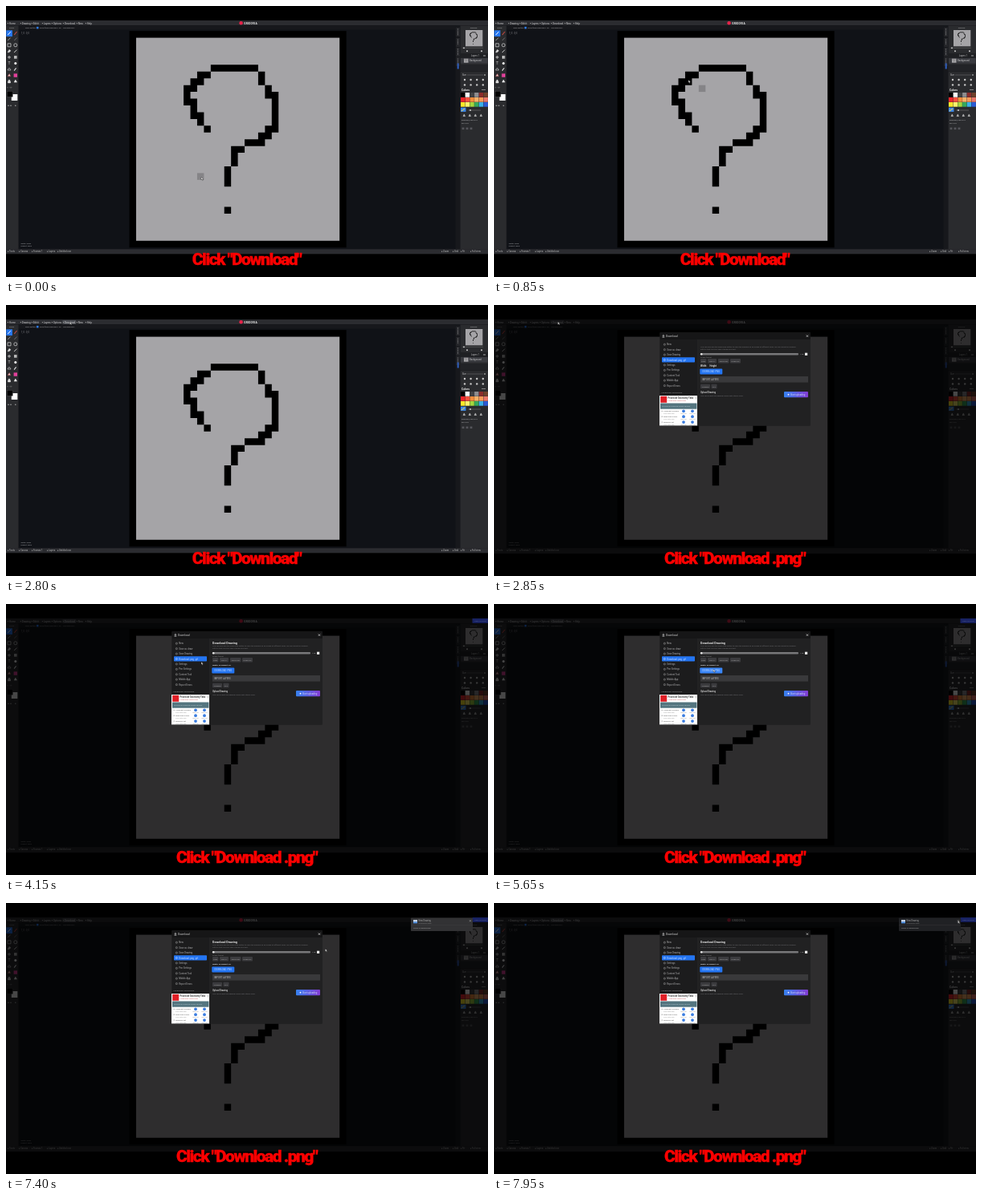
These frames come from a looping animation (600x338 px, 8 s). An HTML page:

```html
<!DOCTYPE html>
<html lang="en">
<head>
<meta charset="utf-8">
<title>Download a drawing</title>
<style>
html, body { margin: 0; width: 100%; height: 100%; overflow: hidden; background: #000; }
svg { display: block; width: 100vw; height: 100vh; }
text { font-family: Roboto, "Open Sans", sans-serif; white-space: pre; }
.caption { font: 900 21px Roboto, "Open Sans", sans-serif; letter-spacing: -1.5px; text-anchor: middle; fill: #f00; stroke: #f00; stroke-width: .3; }
</style>
</head>
<body>
<svg id="stage" viewBox="0 0 600 338"></svg>
<script>
const LOOP = 8000, OPEN = 2850, LOADED = 2900, NOTICE = 6200;
const CELL = 8.44, LEFT = 162, TOP = 39.6, SIZE = 30;

const rect = (x, y, w, h, fill, extra = '') =>
  `<rect x="${x}" y="${y}" width="${w}" height="${h}" fill="${fill}" ${extra}/>`;
const dot = (x, y, r, fill) => `<circle cx="${x}" cy="${y}" r="${r}" fill="${fill}"/>`;
const path = (d, stroke, width = .7, fill = 'none') =>
  `<path d="${d}" stroke="${stroke}" stroke-width="${width}" fill="${fill}"/>`;
const text = (x, y, s, size = 3, fill = '#c8c8ca', extra = '') =>
  `<text x="${x}" y="${y}" font-size="${size}" fill="${fill}" ${extra}>${s}</text>`;
const bold = 'font-weight="700"', mid = 'text-anchor="middle"';
const group = (id, body) => `<g id="${id}">${body}</g>`;

// Strokes of the drawing, in canvas cells: x y w h
const strokes = ['11 4 7 1', '9 5 2 1', '8 6 2 1', '7 7 2 1', '7 8 1 2', '8 9 1 3', '9 11 1 2',
  '10 13 1 1', '18 5 1 2', '19 7 1 2', '20 8 1 6', '19 13 1 1', '18 14 2 1', '16 15 3 1',
  '14 16 2 1', '14 17 1 2', '13 19 1 3', '13 25 1 1'];
const mark = strokes.map(s => {
  const [x, y, w, h] = s.split(' ');
  return `M${x} ${y}h${w}v${h}h-${w}z`;
}).join('');
const drawing = (x, y, scale) => `<path d="${mark}" transform="translate(${x} ${y}) scale(${scale})"/>`;

function topBar() {
  const menu = [[3, 'Home'], [19, 'Drawing'], [33, 'Edit it'], [46, 'Layers'], [58, 'Options'],
    [72, 'Download'], [89, 'New'], [100, 'Help']];
  const options = [[24, 'Pixel perfect'], [42, 'Draw filled pixel'], [59, 'Size 1 px'], [71, 'Transparency']];
  return rect(0, 18, 600, 6.5, '#2b2c30') + rect(0, 24.5, 565, 5, '#17181c') +
    rect(0, 24.3, 600, .4, '#101114') +
    group('hover', rect(70.5, 19, 16.5, 5, '#4a4c52')) +
    menu.map(([x, s]) => dot(x - .6, 21.6, .7, '#aaa') + text(x + .8, 22.7, s, 3, '#d4d4d6')).join('') +
    dot(292.6, 21.2, 2.3, '#e5234a') +
    text(296.3, 22.7, 'GRIDOVIA', 3.3, '#eee', bold + ' letter-spacing=".2"') +
    options.map(([x, s]) => text(x, 28.2, s, 2.4, '#a9a9ad')).join('') +
    rect(38, 25.9, 2.5, 2.5, '#2f7cf6');
}

function leftPanel() {
  let s = rect(0, 24.5, 15.5, 279, '#2a2b2e') + text(7, 28, 'Tools', 2.5, '#bbb', mid);
  s += rect(.3, 30.3, 7.6, 7.8, '#2878f0') + path('M2.3 36l3.4-3.7', '#fff', 1) + path('M10.3 36l3.2-4', '#c54a42', 1.1);
  const icons = [
    (x, y) => path(`M${x - 2} ${y - 2}h4v4h-4z`, '#ddd', .7),
    (x, y) => `<circle cx="${x}" cy="${y}" r="2" fill="none" stroke="#ddd" stroke-width=".7"/>`,
    (x, y) => path(`M${x - 2} ${y + 1.5}l2-3.5 2 1.5-2 2z`, '#ddd', .4, '#ddd'),
    (x, y) => path(`M${x - 1.7} ${y + 1.7}l3.4-3.4`, '#ddd', .9),
    (x, y) => path(`M${x - 2} ${y}h4M${x} ${y - 2}v4`, '#ddd', .8),
    (x, y) => rect(x - 1.8, y - 1.8, 3.6, 3.6, '#bbb'),
    (x, y) => text(x, y + 1.7, 'T', 5, '#ddd', mid),
    (x, y) => dot(x, y, 1.5, '#fff'),
    (x, y) => path(`M${x - 2} ${y + 1}q2-5 4 0z`, '#ddd', .6),
    (x, y) => path(`M${x - 1.7} ${y + 1.7}l2.5-3.4`, '#ddd', 1.1),
    (x, y) => path(`M${x - 1.8} ${y + 1}l2-3 1.5 3z`, '#d44', .4, '#ddd'),
    (x, y) => rect(x - 2.2, y - 2.2, 4.4, 4.4, '#e2409b'),
    (x, y) => path(`M${x - 1.5} ${y - .2}h3v2h-3zM${x - .8} ${y}v-1.8h1.6v1.8`, '#eee', .5, '#ddd'),
    (x, y) => path(`M${x} ${y - 2}l1.7 3h-3.4z`, '#eee', .5, '#eee')
  ];
  icons.forEach((icon, i) => s += icon(i % 2 ? 11.8 : 4, 48.8 + Math.floor(i / 2) * 7.55));
  s += path('M10.3 43l3.2-3.4', '#999', .6) + path('M2.2 43l3.4-3.4', '#ddd', .6);
  s += text(1.3, 103.3, '‹›  «»', 3, '#aaa');
  s += rect(6.8, 110, 7.5, 8, '#fff') + rect(1.3, 106.3, 7, 7, '#000', 'stroke="#555" stroke-width=".4"');
  return s + [3, 6, 11.8].map(x => dot(x, 124.2, .8, '#aaa')).join('');
}

function rightPanel() {
  const palette = ['#000', '#fff', '#414244', '#8d8d8f', '#8c2d2b', '#70422b',
    '#f0252b', '#f5503e', '#f58d3b', '#f7b167', '#f59a58', '#e9776a',
    '#ffe928', '#fff36b', '#a4d63d', '#35a95a', '#39b0e8', '#2b5bd5'];
  let s = rect(559.5, 24.5, 6, 279, '#17181c') + rect(565.5, 24.5, 34.5, 279, '#2a2b2e');
  [[28, 'Preview'], [41, 'Layers'], [53, 'Frames'], [65, 'Colors']].forEach(([y, label]) =>
    s += rect(560.3, y - 1, 4.8, 11, '#25262a') +
      text(0, 0, label, 2.5, '#aaa', `transform="translate(562 ${y}) rotate(90)"`));
  s += rect(561.7, 71.5, 2, 7, '#315fbd');
  s += text(582, 28, 'Preview', 2.5, '#bbb', mid) + rect(572, 30, 21.3, 20.3, '#a5a4a7') + drawing(572.2, 29.8, .69);
  s += path('M568 52.3h26', '#666', .6) + dot(570, 52.3, .9, '#ddd') + [574, 592].map(x => dot(x, 56.3, 1, '#ccc')).join('');
  s += rect(565.5, 59, 34.5, 5.8, '#1f2023') + text(579, 63, 'Layers 1', 2.7) + path('M594 62h3', '#ddd');
  s += rect(566, 65, 33.5, 6.5, '#3a3b40') + rect(570, 65.7, 5.5, 5, '#a5a4a7') + drawing(570.2, 65.5, .17) +
    text(577, 69.3, 'Background', 2.8);
  s += rect(565.5, 73, 34.5, 8, '#222327') + rect(565.5, 81, 34.5, .6, '#15161a') +
    text(568, 86.6, 'Size', 2.6) + path('M574 86h20', '#777', .5) + dot(596, 86, .8, '#ddd');
  for (let i = 0; i < 8; i++) s += dot(571 + i % 4 * 7.6, i < 4 ? 92 : 98.4, 1.2, '#ccc');
  s += text(567, 105.5, 'Colors', 3.4, '#eee', bold) + path('M592 104.5h5', '#aaa');
  palette.forEach((c, i) => s += rect(566 + i % 6 * 5.7, 108 + Math.floor(i / 6) * 6, 5.4, 5.7, c));
  s += rect(566, 126.7, 6.5, 5.2, '#3d89e8') + path('M567 131l4-3', '#f3d34b', 1) +
    path('M575 130h16', '#777', .6) + dot(578, 130, .9, '#ddd');
  for (let i = 0; i < 4; i++) s += path(`M${569 + i * 7} 137.5h2.6l-1.3-2.6z`, '#ccc', .5, '#aaa');
  return s + text(567, 143.4, '#000000, rgb 0 0 0', 2.4) + text(567, 146.8, 'hsl 0 0 0', 2.4) +
    [569, 574, 579].map(x => rect(x - 1.4, 151.5, 2.8, 2.6, '#55565b')).join('');
}

function statusBar() {
  const labels = [[4, 'Tools'], [18, 'Canvas'], [34, 'Frames 1'], [53, 'Layers'], [66, 'Untitled one'],
    [544, 'Zoom'], [558, 'Grid'], [568, 'Fit'], [580, 'Full view']];
  return rect(0, 303.3, 600, 6, '#2b2c30') +
    labels.map(([x, s]) => dot(x - 1.4, 306.2, .6, '#aaa') + text(x, 307.2, s, 2.8, '#bbb')).join('');
}

function app() {
  const side = SIZE * CELL;
  return rect(0, 18, 600, 291, '#101217') + topBar() +
    rect(LEFT - CELL, TOP - CELL, side + 2 * CELL, side + 2 * CELL, '#000') +
    rect(LEFT, TOP, side, side, '#a5a4a7') +
    drawing(LEFT, TOP, CELL) +
    rect(0, 0, CELL, CELL, '#858487', 'id="brush"') +
    leftPanel() + rightPanel() + statusBar() +
    text(19, 34.5, '1, 0 : 0, 0', 2.6, '#8b8c90') +
    text(18.5, 297.3, 'Width: 30px', 2.4, '#b9b9bc') + text(18.5, 300.2, 'Height: 30px', 2.4, '#b9b9bc');
}

function sponsor() {
  let s = text(208, 109.6, 'ADVERTISE SPONSORS', 2.5, '#999') + rect(206, 113, 47, 37.4, '#fff') +
    rect(207.2, 113.8, 8, 8, '#e01f26') + text(216.5, 117, 'Practical Geometry Tabs', 2.9, '#444', bold) +
    text(216.5, 120.4, 'Measuring made easy', 2.3, '#c6575b') + dot(251.5, 115, .5, '#888') + dot(251.5, 116.8, .5, '#888') +
    rect(207, 122.5, 45.5, 7.2, '#54757f') + text(209, 127, 'Technical drawing made simple', 2.5, '#b5c8cf');
  ['Compact models', 'Real-time Tools', 'Reliable set'].forEach((label, i) => {
    const y = 132.3 + i * 6.9;
    s += dot(209.2, y, .6, '#888') + text(211, y + 1, label, 2.5, '#555') + text(211, y + 3.6, 'more detail here', 1.9, '#999');
    [236, 247].forEach(x => s += dot(x, y, 1.9, '#3b7de0') + text(x, y + 4.1, 'Basic set', 1.7, '#888', mid));
  });
  return s;
}

function dialog() {
  const items = ['New', 'Save as .draw', 'Save Drawing', 'Download .png, .gif', 'Settings',
    'Pen Settings', 'Content Tool', 'Mobile App', 'Report Errors'];
  const pill = (x, y, w, label) => rect(x, y, w, 5.5, '#3b3b3e', 'rx=".7"') +
    text(x + w / 2, y + 3.7, label, 2.5, '#aaa', mid);
  let s = rect(206.5, 34, 187.5, 116.7, '#212122', 'rx="1"') + rect(206.5, 34, 187.5, 9, '#161617', 'rx="1"') +
    rect(206.5, 43, 47, 70, '#1c1c1d') + rect(253.3, 43, .4, 107.7, '#2b2b2d') +
    path('M209.5 40.2h2.8M210.9 36.8v2.2M209.8 38.2l1.1 1.2 1.1-1.2', '#ddd', .7) +
    text(214, 39.9, 'Download', 3.3, '#d0d0d0') + path('M388.8 37.5l2.3 2.3m0-2.3l-2.3 2.3', '#ddd', .7);
  items.forEach((label, i) => {
    const y = 49.2 + i * 6.42, on = i === 3;
    if (on) s += rect(209, y - 3.2, 41, 6.2, '#2475f2', 'rx=".8"');
    s += rect(211.4, y - .9, 1.9, 1.9, 'none', `stroke="${on ? '#dbe8ff' : '#aaa'}" stroke-width=".5" rx=".4"`) +
      text(215.3, y + 1.1, label, 2.8, on ? '#cfe0ff' : '#b0b0b2');
  });
  s += sponsor();
  s += text(257, 52.7, 'You can also use the download button to save the drawing as an image at different sizes. We also keep the drawing', 2.35, '#77777a') +
    text(257, 55.9, 'safe so that you can open it again and edit.', 2.35, '#77777a') +
    rect(257, 60, 122, 2.5, '#78787a', 'rx="1"') + dot(258.2, 61.2, 1.3, '#e5e5e5') +
    text(381, 62.3, '1.0x', 2.4) + rect(387, 59.7, 3.2, 3.2, '#eee') + text(257, 66.2, 'Image format', 2.3, '#888');
  [[257, 7.5, 'PNG'], [266, 11, 'GIF x1'], [279, 13.5, 'PNG Img'], [294, 13, 'FORMAT']]
    .forEach(([x, w, label]) => s += pill(x, 67, w, label));
  s += rect(256.3, 79.6, 28, 7, '#2475f2', 'rx="1" id="save"') +
    text(270.3, 84.2, 'DOWNLOAD .PNG', 2.7, '#c4dafc', mid) +
    rect(257, 89, 134, 7.6, '#39393b') + text(259, 93.9, 'IMPORT LAYERS', 2.8, '#bbb') +
    pill(257, 98.8, 12, 'JOINED') + pill(270.5, 98.8, 7, 'ALL') +
    text(257, 110.4, 'Upload Drawing', 2.7, '#c4c4c4', bold) +
    text(257, 114.3, 'You can share the drawing online with others here.', 2.4, '#7c7c80') +
    rect(361, 108, 30, 7.2, 'url(#blend)', 'rx="1"') + dot(366.5, 111.7, .9, '#fff') +
    text(369, 112.7, 'Start uploading', 2.7, '#d6d9f6');
  const label = (x, s) => text(x, 77.4, s, 2.8, '#ddd', bold);
  return s + group('pending', label(257, 'Width') + label(268.5, 'Height')) +
    group('loaded', text(257, 50.1, 'Download Drawing', 3.7, '#e4e4e4', bold) +
      text(257, 77.4, 'Width: 30 Height: 30', 2.5, '#ddd', bold) +
      rect(580.5, 18, 19.5, 5.8, '#182263') + text(583, 22, 'Open account', 2.4, '#5a669c'));
}

function notice() {
  return rect(504, 18.5, 77, 16.5, '#323234', 'rx=".8" id="card"') +
    rect(507, 21, 5, 4, '#c3d0e2') + rect(507, 23.4, 5, 2, '#4a8bdd') +
    text(513.6, 23.3, 'New Drawing', 2.6, '#aaa') + text(513.6, 26.2, 'Download done', 2.3, '#888') +
    rect(504, 27.5, 77, .3, '#434345') + text(507, 32.2, 'Show in downloads', 2.5, '#aaa') +
    path('M576.9 21.3l2 2m0-2l-2 2', '#bbb', .5);
}

const $ = id => document.getElementById(id);
$('stage').innerHTML =
  `<defs><linearGradient id="blend"><stop stop-color="#3682f0"/><stop offset="1" stop-color="#843cd4"/></linearGradient>
   <clipPath id="screen"><rect y="18" width="600" height="291"/></clipPath></defs>` +
  rect(0, 0, 600, 338, '#000') + app() +
  group('modal', rect(0, 18, 600, 291, '#000', 'opacity=".72"') + dialog()) +
  `<g clip-path="url(#screen)">${group('notice', notice())}</g>` +
  group('cursor', path('M0 0v3.4l.9-.8.7 1.5.6-.3-.7-1.4h1.1z', '#111', .35, '#fff')) +
  '<text id="caption" class="caption" x="299.5" y="323.3"></text>';

const linear = u => u, easeIn = u => u * u, easeOut = u => 1 - (1 - u) ** 2;
const smooth = u => u * u * (3 - 2 * u);
const still = () => 0;

// Pointer stops: time, x, y, and the easing used to leave the stop
const stops = [[0, 243, 213.5, still], [50, 243, 213.5, easeIn], [800, 257, 103, linear],
  [850, 242.5, 92.5, easeOut], [1700, 79.5, 21, still], [3550, 79.5, 21, smooth],
  [4350, 273, 81.5, still], [7050, 273, 81.5, smooth], [7850, 577.5, 22, still], [LOOP, 577.5, 22, still]];

function pointer(t) {
  t = Math.max(0, t);
  let i = 0;
  while (i < stops.length - 2 && t >= stops[i + 1][0]) i++;
  const [t0, x0, y0, ease] = stops[i], [t1, x1, y1] = stops[i + 1];
  const u = ease((t - t0) / (t1 - t0));
  return [x0 + (x1 - x0) * u, y0 + (y1 - y0) * u];
}

const show = (id, on) => $(id).setAttribute('visibility', on ? 'inherit' : 'hidden');
const move = (id, x, y) => $(id).setAttribute('transform', `translate(${x} ${y})`);

function render(t) {
  const [x, y] = pointer(t);
  const over = (left, top, right, bottom) => x > left && x < right && y > top && y < bottom;
  move('cursor', x, y);

  // The brush preview trails the pointer and snaps to cells
  const [bx, by] = pointer(t - 50);
  const col = Math.floor((bx - LEFT) / CELL), row = Math.floor((by - TOP) / CELL);
  const inside = n => n >= 0 && n < SIZE;
  move('brush', LEFT + col * CELL, TOP + row * CELL);
  show('brush', inside(col) && inside(row) && t < OPEN);

  const open = t >= OPEN, loaded = t >= LOADED;
  show('hover', t >= 1600);
  show('modal', open);
  show('pending', !loaded);
  show('loaded', loaded);
  // A hidden modal must hide both of its label groups
  $('modal').style.display = open ? '' : 'none';
  $('save').setAttribute('fill', over(256, 79, 285, 87) ? '#3a86f7' : '#2475f2');
  $('caption').textContent = open ? 'Click "Download .png"' : 'Click "Download"';

  const slide = Math.min(1, Math.max(0, (t - NOTICE) / 300));
  show('notice', t >= NOTICE);
  move('notice', 96 * (1 - easeOut(slide)), 0);
  $('card').setAttribute('fill', over(504, 18, 581, 35) ? '#202124' : '#323234');
}

function tick(now) {
  render(now % LOOP);
  requestAnimationFrame(tick);
}
render(0);
requestAnimationFrame(tick);
</script>
</body>
</html>
```
